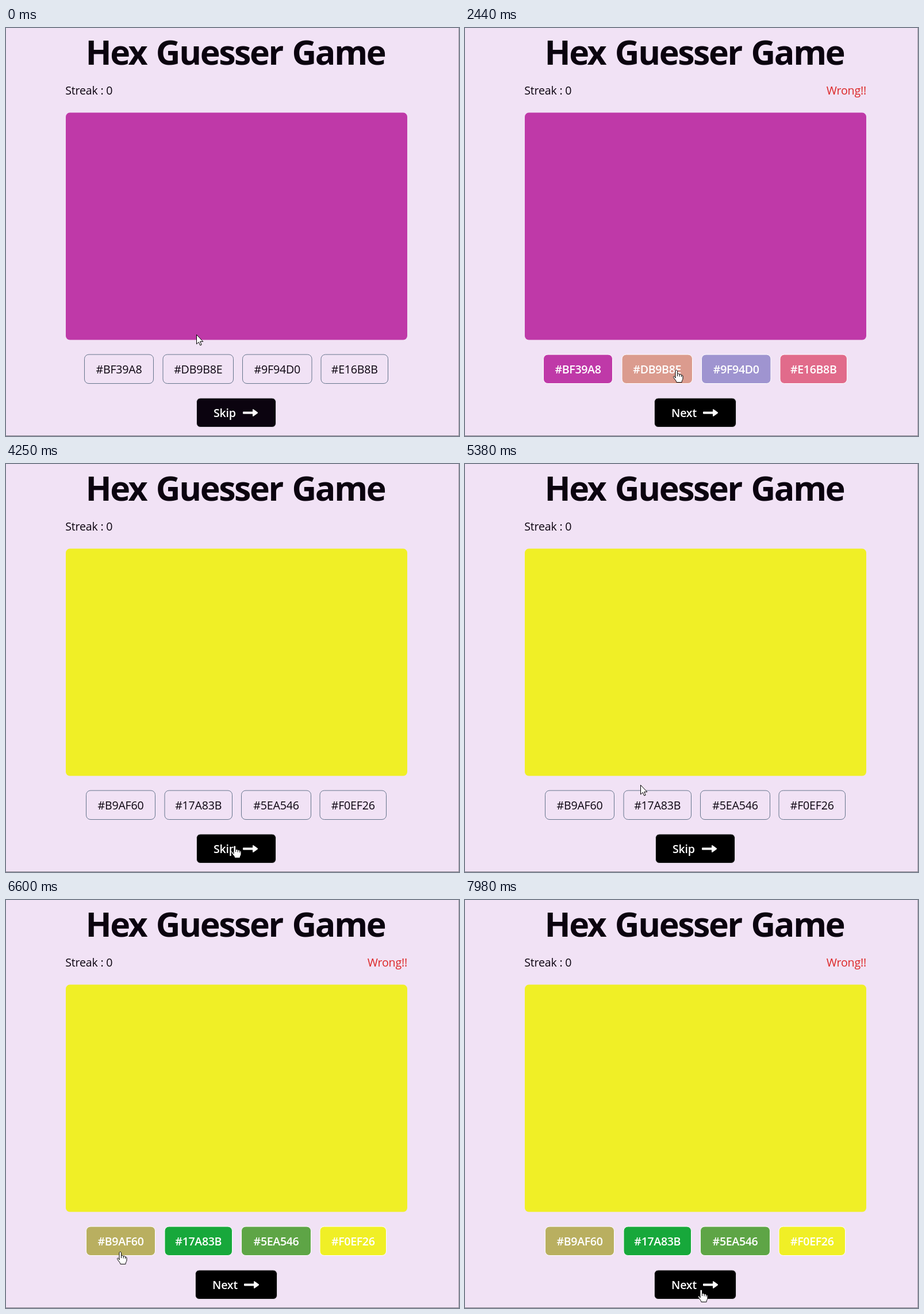
These frames come from a looping animation (788x711 px, 8000 ms). An HTML page:

```html
<!DOCTYPE html>
<html lang="en">
<head>
<meta charset="utf-8">
<title>Hex Guesser Game</title>
<style>
  html, body { margin: 0; width: 100%; height: 100%; overflow: hidden; background: #f1e2f5; }
  svg { display: block; width: 788px; height: 711px; }
  text { font: 500 19.6px "Open Sans", "Noto Sans", sans-serif; letter-spacing: -.2px; fill: #0b030f; }
  .title { font-size: 59px; font-weight: 700; letter-spacing: -.04em; word-spacing: .06em; }
  .mid { text-anchor: middle; }
  .wrong { text-anchor: end; fill: #dc2626; }
  .chip { fill: none; stroke: #64748b; }
  .shown .chip { stroke: #fff; }
  .shown .mid { fill: #fff; font-weight: 600; letter-spacing: -.35px; }
  .action text { fill: #fff; font-weight: 600; }
  .action rect { stroke: #d9d2dd; }
  .action path { fill: #fff; }

  .round { opacity: 0; animation: 8s step-end infinite; }
  #ask1 { animation-name: ask1; }
  #end1 { animation-name: end1; }
  #ask2 { animation-name: ask2; }
  #end2 { animation-name: end2; }
  @keyframes ask1 { 0% { opacity: 1 } 30.5%, 100% { opacity: 0 } }
  @keyframes end1 { 0% { opacity: 0 } 30.5% { opacity: 1 } 53.125%, 100% { opacity: 0 } }
  @keyframes ask2 { 0% { opacity: 0 } 53.125% { opacity: 1 } 82.5%, 100% { opacity: 0 } }
  @keyframes end2 { 0% { opacity: 0 } 82.5%, 100% { opacity: 1 } }

  #cursor { animation: move 8s step-end infinite; }
  #cursor path { fill: #fff; stroke: #000; stroke-linejoin: round; }
  #arrow { animation: arrow 8s step-end infinite; }
  #hand { animation: hand 8s step-end infinite; }

  /* the pointer advances in small jumps, then rests */
  @keyframes move {
    0% { transform: translate(331px, 534px); }
    .75% { transform: translate(331px, 534px); animation-timing-function: steps(3, start); }
    2.25% { transform: translate(278px, 555px); }
    4% { transform: translate(278px, 555px); animation-timing-function: steps(5, start); }
    8.288% { transform: translate(400px, 649px); animation-timing-function: steps(3, start); }
    10.863% { transform: translate(383px, 632px); }
    12.75% { transform: translate(383px, 632px); animation-timing-function: steps(3, start); }
    14.438% { transform: translate(336px, 633px); animation-timing-function: steps(3, start); }
    16.663% { transform: translate(318px, 617px); animation-timing-function: steps(5, start); }
    20.375% { transform: translate(368px, 596px); }
    44.25% { transform: translate(368px, 596px); animation-timing-function: steps(5, start); }
    47.375% { transform: translate(398px, 665px); }
    58.625% { transform: translate(398px, 665px); animation-timing-function: steps(5, start); }
    62.163% { transform: translate(282px, 540px); animation-timing-function: steps(2, start); }
    63.588% { transform: translate(290px, 517px); animation-timing-function: steps(3, start); }
    65.713% { transform: translate(313px, 534px); }
    67.25% { transform: translate(305px, 559px); }
    68% { transform: translate(305px, 559px); animation-timing-function: steps(5, start); }
    71.75% { transform: translate(214px, 621px); animation-timing-function: steps(3, start); }
    74% { transform: translate(199px, 613px); }
    90.875% { transform: translate(199px, 613px); animation-timing-function: steps(8, start); }
    97.975% { transform: translate(424px, 689px); animation-timing-function: steps(2, start); }
    99.75%, 100% { transform: translate(411px, 679px); }
  }
  @keyframes arrow {
    0%, 6.57%, 8.288%, 44.875%, 58.625%, 60.75%, 68.75%, 71%, 90.875% { opacity: 1; }
    4%, 7.43%, 15.9%, 46.125%, 59.338%, 68%, 69.5%, 71.75%, 94.425%, 100% { opacity: 0; }
  }
  @keyframes hand {
    0%, 6.57%, 8.288%, 44.875%, 58.625%, 60.75%, 68.75%, 71%, 90.875% { opacity: 0; }
    4%, 7.43%, 15.9%, 46.125%, 59.338%, 68%, 69.5%, 71.75%, 94.425%, 100% { opacity: 1; }
  }
</style>
</head>
<body>
<svg viewBox="0 0 788 711" xmlns="http://www.w3.org/2000/svg">
  <rect width="788" height="711" fill="#f1e2f5"/>
  <text class="title" x="138.5" y="64">Hex Guesser Game</text>
  <text x="103.3" y="116">Streak : 0</text>
  <g id="rounds"></g>
  <path d="M787.5 0V711" stroke="#aaa2ad"/>
  <path d="M0 710.5H788" stroke="#89838c"/>
  <g id="cursor">
    <path id="arrow" d="M.5 .5V16.8L4.2 13.3L6.8 19L9.2 18L6.7 12.4H11.8Z"/>
    <path id="hand" d="M-2 14V1.8C-2-.2 1.6-.2 1.6 1.8V7.2C2.6 6 5 6.4 5.2 8C6.4 7 8.4 7.6 8.6 9.2C10 8.6 11 9.6 11 11V15C11 17 9 18 9 21.5H0C0 18.5-4.5 15.5-5.5 12.5C-5.8 10.5-3.5 10.5-2 13ZM1.6 7.2V11M5.2 8V11.5M8.6 9.2V12"/>
  </g>
</svg>
<script>
  // each chip: label, left edge, right edge
  const first = [["#BF39A8", 136, 257], ["#DB9B8E", 272.5, 396], ["#9F94D0", 411, 532.5], ["#E16B8B", 547.5, 665]];
  const second = [["#B9AF60", 139, 260], ["#17A83B", 275.5, 394], ["#5EA546", 409, 531], ["#F0EF26", 545.5, 662]];

  const chip = shown => ([label, left, right]) => `
    <rect class="chip" x="${left + .5}" y="569" width="${right - left - 1}" height="50.5" rx="7.5"
      ${shown ? `style="fill:${label}"` : ""}/>
    <text class="mid" x="${(left + right) / 2}" y="602">${label}</text>`;

  const action = (label, left, right, color) => `
    <g class="action">
      <rect x="${left - .5}" y="645" width="${right - left + 1}" height="50.5" rx="6.5" fill="${color}"/>
      <text x="${left + 29}" y="678">${label}</text>
      <path transform="translate(${right - 57} 670.5)"
        d="M1-2H17V-5.2Q17-7 18.6-6L25.6-.9Q26.6 0 25.6 .9L18.6 6Q17 7 17 5.2V2H1Q0 2 0 1V-1Q0-2 1-2Z"/>
    </g>`;

  const round = (id, answer, chips, shown, color) => `
    <g id="${id}" class="round ${shown ? "shown" : ""}">
      <rect x="104" y="147.6" width="594" height="396" rx="7" fill="${answer}"/>
      ${chips.map(chip(shown)).join("")}
      ${shown ? '<text class="wrong" x="698" y="116">Wrong!!</text>' : ""}
      ${shown ? action("Next", 330, 471, color) : action("Skip", 332, 469, color)}
    </g>`;

  document.getElementById("rounds").innerHTML =
    round("ask1", "#BF39A8", first, false, "#0b030f") +
    round("end1", "#BF39A8", first, true, "#000") +
    round("ask2", "#F0EF26", second, false, "#000") +
    round("end2", "#F0EF26", second, true, "#000");
</script>
</body>
</html>
```
